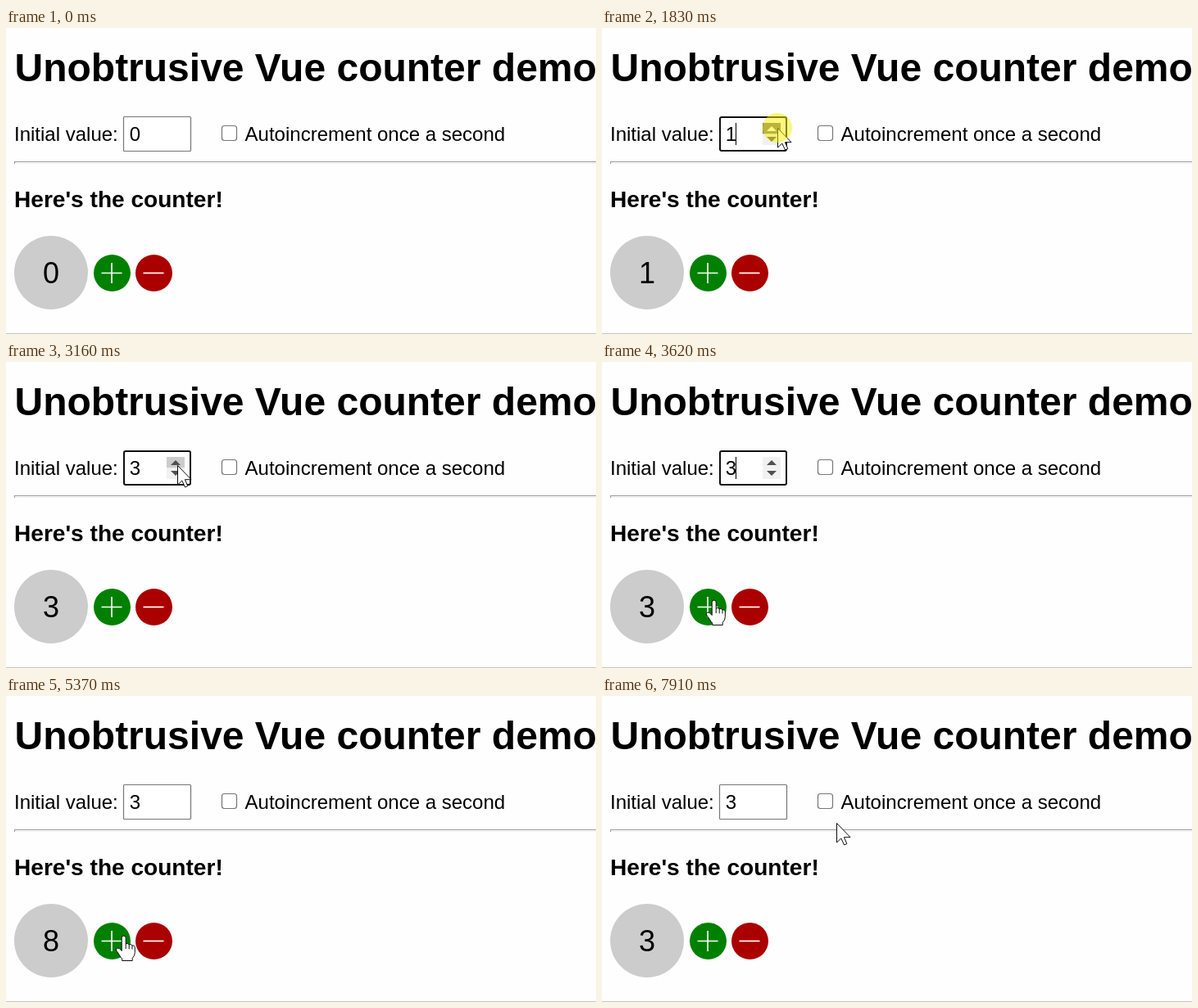
These frames come from a looping animation (720x374 px, 8000 ms). An HTML page:

```html
<!DOCTYPE html>
<html lang="en">
<head>
<meta charset="utf-8">
<title>Counter demo</title>
<style>
  html, body { margin: 0; width: 100%; height: 100%; overflow: hidden; background: #fefefe; }
  svg { display: block; width: 720px; height: 374px; }
  text { font: 24px Arial, "Liberation Sans", sans-serif; white-space: pre; }
  .h1 { font-size: 48px; font-weight: bold; }
  .h3 { font-size: 28.08px; font-weight: bold; }
  #count { font-size: 36px; text-anchor: middle; }
  .sign { stroke: #fff; stroke-width: 1.7; }
  .cursor { fill: #fff; stroke: #000; stroke-width: .95; stroke-linejoin: round; }
  .box { fill: #fff; stroke: #767676; stroke-width: 1.2; }
  #field.hover { stroke: #4f4f4f; }
  #field.focus { stroke: #101010; stroke-width: 2; }
  .spin rect { fill: #f1f1f1; }
  .spin path { fill: #505050; }
  .spin.hover rect { fill: #ccc; }
  .spin.down rect { fill: #787878; }
  .spin.down path { fill: #fff; }
</style>
</head>
<body>
<svg viewBox="0 0 720 374">
  <text class="h1" x="10.5" y="65">Unobtrusive Vue counter demo</text>
  <text x="10" y="138">Initial value:</text>
  <rect id="field" class="box"/>
  <text id="value" x="150.8" y="138">0</text>
  <rect id="caret" x="163" y="116" width="1" height="27"/>
  <g id="spins">
    <g id="up" class="spin"><rect x="196" y="116" width="22" height="13.5"/><path d="M201 126l6-6 6 6z"/></g>
    <g id="dn" class="spin"><rect x="196" y="129.5" width="22" height="13.5"/><path d="M201 133l6 6 6-6z"/></g>
  </g>
  <rect class="box" x="263.5" y="119.5" width="18" height="18" rx="3"/>
  <text x="291.6" y="138">Autoincrement once a second</text>
  <path d="M10 163H720V164H11V166H10Z" fill="#9a9a9a"/>
  <path d="M11 165H720V166H11Z" fill="#eee"/>

  <text class="h3" x="10" y="219">Here's the counter!</text>
  <circle cx="55" cy="299" r="45" fill="#ccc"/>
  <text id="count" x="55" y="312">0</text>
  <circle cx="129.5" cy="299.5" r="22.5" fill="#008000"/>
  <path class="sign" d="M116.5 299.5h25M129 287v25"/>
  <circle cx="180.5" cy="299.5" r="22.5" fill="#a00"/>
  <path class="sign" d="M167.5 299.5h25"/>
  <path d="M0 373H720V374H0Z" fill="#c4c4c4"/>

  <g id="pointer">
    <path id="arrow" class="cursor" d="M.5 .5V24L5.8 19 9.5 27 12.8 25.6 9.4 17.7H17Z"/>
    <g id="hand" class="cursor" transform="translate(.7 .5)">
      <path d="M-1.5 3.2Q-1.5 .6 1 .6T3.500 3.200V10.500Q5.500 8.800 7.500 11.300 9.700 10 11.300 12.600 14.600 11.700 14.600 15.500V21Q14.600 25 11.500 28V31H-1V28.600Q-3 27-4.500 23.800L-8 18.800Q-9 16.500-7 15.500T-1.500 19Z"/>
      <path d="M3.5 10.5v6M7.5 11.3v5.5M11.3 12.6v4.5" fill="none"/>
    </g>
    <circle id="glow" r="18" fill="#f8f000" fill-opacity=".5"/>
  </g>
</svg>
<script>
const LOOP = 8000;
const $ = id => document.getElementById(id);

// Pointer travel: start, end, number of held positions, from, to
const moves = [
  [300, 1080, 8, [508, 362], [213, 139]],
  [1180, 1400, 3, [213, 133], [214, 122]],
  [3160, 3620, 5, [209, 126], [135, 290]],
  [5370, 5710, 4, [142, 292], [185, 299]],
  [7570, 7910, 4, [190, 291], [286, 155]]
];
const presses = [[1830, 2270], [2390, 2620], [3940, 4940], [5930, 7040]];
const carets = [[1830, 2940], [3510, 3940]];
const spinClicks = [1830, 2050, 2390];
const plusClicks = [4060, 4280, 4500, 4720, 4940];
const minusClicks = [6160, 6380, 6600, 6820, 7040];

const within = (t, spans) => spans.some(([a, b]) => t >= a && t < b);
const passed = (t, times) => times.filter(x => t >= x).length;
const ease = u => u * u * (3 - 2 * u);
const show = (id, on) => $(id).style.display = on ? "" : "none";
const set = (id, attrs) => Object.entries(attrs).forEach(([k, v]) => $(id).setAttribute(k, v));

function pointerAt(t) {
  const move = moves.filter(m => t >= m[0]).pop();
  if (!move) return null;
  const [start, end, count, from, to] = move;
  const last = count - 1;
  const step = Math.min(last, Math.floor((t - start + 2) / (end - start) * last));
  const k = ease(step / last);
  return from.map((v, i) => Math.round(v + (to[i] - v) * k));
}

function draw(t) {
  const pos = pointerAt(t);
  const [x, y] = pos || [-99, -99];
  const inField = x >= 143 && x < 226 && y >= 108 && y < 151;
  const inSpin = inField && x >= 196 && x < 218;
  const upper = inSpin && y < 129.5;
  const onButton = [129.5, 180.5].some(cx => Math.hypot(x - cx, y - 299.5) < 22.5);
  const focus = within(t, [[1830, 3940]]);
  const pressed = within(t, presses);
  const initial = passed(t, spinClicks);
  const inset = focus ? 1 : .5;

  $("value").textContent = initial;
  $("count").textContent = initial + passed(t, plusClicks) - passed(t, minusClicks);
  set("field", {
    class: "box " + (focus ? "focus" : inField ? "hover" : ""),
    x: 143 + inset, y: 108 + inset,
    width: 83 - 2 * inset, height: 43 - 2 * inset,
    rx: 2 * inset
  });
  show("caret", within(t, carets));
  show("spins", focus || inField);
  set("up", { class: "spin " + (upper ? pressed ? "down" : "hover" : "") });
  set("dn", { class: "spin " + (inSpin && !upper ? "hover" : "") });

  set("pointer", { transform: `translate(${x} ${y})` });
  show("pointer", pos);
  show("glow", pressed);
  show("hand", onButton);
  show("arrow", !onButton);
}

const begin = performance.now();
function tick() {
  draw((performance.now() - begin) % LOOP);
  requestAnimationFrame(tick);
}
tick();
</script>
</body>
</html>
```
